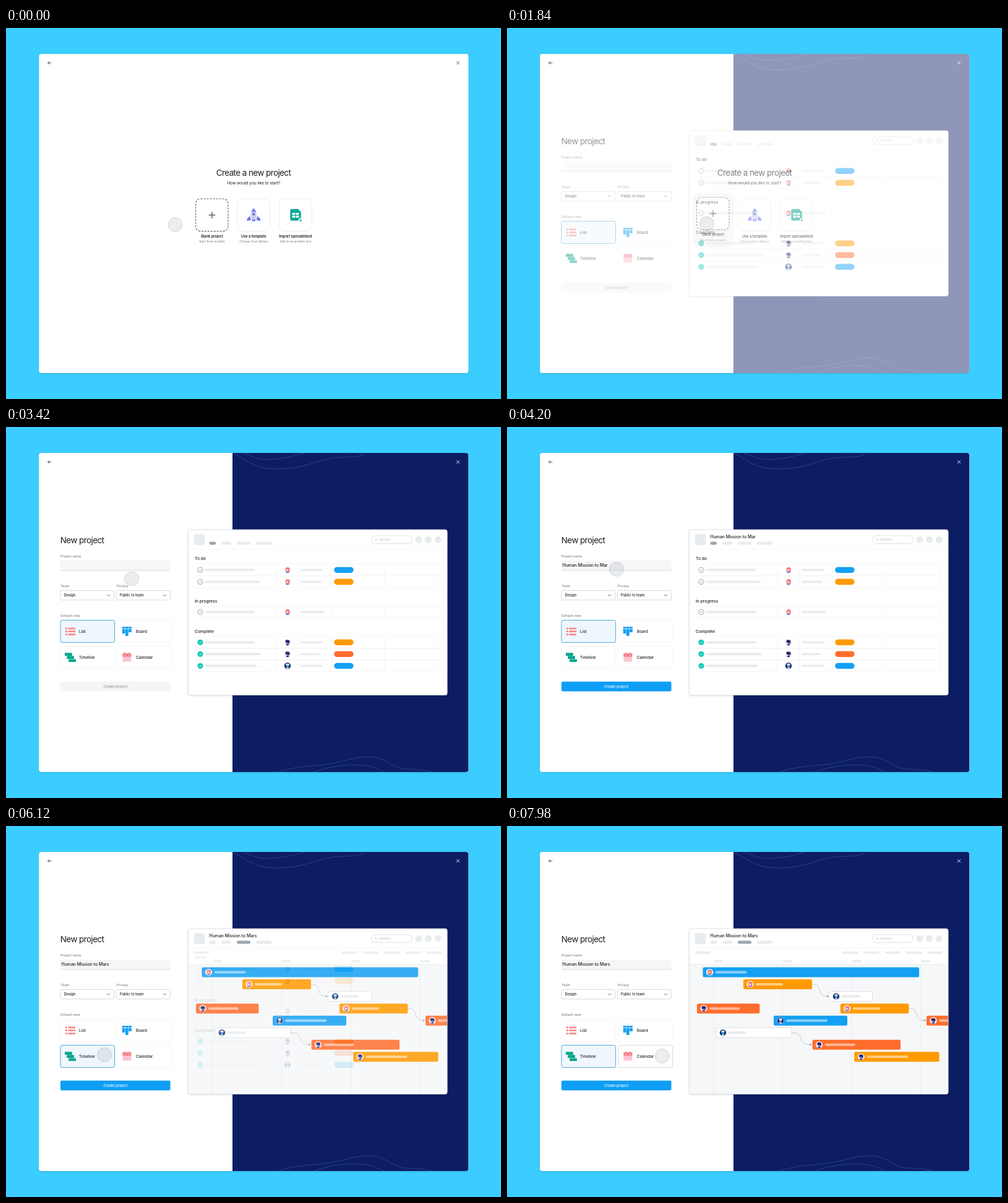
These frames come from a looping animation (800x600 px, 8 s). An HTML page:

```html
<!DOCTYPE html>
<html lang="en">
<head>
<meta charset="utf-8">
<title>New project flow</title>
<style>
  html, body { margin: 0; width: 100%; height: 100%; overflow: hidden; background: #3bcdff; }
  svg { display: block; width: 100vw; height: 100vh; }
  text { font-family: Inter, "Open Sans", sans-serif; fill: #1e1f21; white-space: pre; }
  .head { font-size: 13.5px; letter-spacing: -.6px; }
  .sub { font-size: 6.7px; letter-spacing: -.1px; }
  .name { font-size: 5.75px; font-weight: 600; letter-spacing: -.05px; }
  .note { font-size: 4.9px; fill: #76787b; }
  .label { font-size: 5.4px; fill: #6a6c70; }
  .value { font-size: 5.7px; font-weight: 500; }
  .tile { font-size: 6.3px; font-weight: 500; }
  .group { font-size: 6.75px; font-weight: 500; }
  .title { font-size: 6.9px; font-weight: 500; letter-spacing: -.03px; }
  .mid { text-anchor: middle; }
</style>
</head>
<body>
<svg id="stage" viewBox="0 0 800 600" preserveAspectRatio="none" xmlns="http://www.w3.org/2000/svg"></svg>
<script>
const LOOP = 8000;
const TITLE = 'Human Mission to Mars';
const BLUE = '#14a0f3', ORANGE = '#ff9a00', RED = '#ff6d2d', TEAL = '#14c8b8', PALE = '#e8ecee';

const rect = (x, y, w, h, r, fill, extra = '') =>
  `<rect x="${x}" y="${y}" width="${w}" height="${h}" rx="${r}" fill="${fill}" ${extra}/>`;
const pill = (x, y, w, h, fill = PALE, extra = '') => rect(x, y - h / 2, w, h, h / 2, fill, extra);
const dot = (x, y, r, fill, extra = '') => `<circle cx="${x}" cy="${y}" r="${r}" fill="${fill}" ${extra}/>`;
const line = (d, stroke, width = 1, extra = '') =>
  `<path d="${d}" fill="none" stroke="${stroke}" stroke-width="${width}" ${extra}/>`;
const shape = (d, fill) => `<path d="${d}" fill="${fill}"/>`;
const text = (x, y, cls, str, extra = '') => `<text x="${x}" y="${y}" class="${cls}" ${extra}>${str}</text>`;
const group = (id, body, extra = '') => `<g id="${id}" ${extra}>${body}</g>`;

// Small portraits: 0 coral hair, 1 dark hair, 2 white cap
function avatar(x, y, kind) {
  const looks = [
    dot(0, 0, 5, '#fdeaea') + rect(-3, -4, 6.4, 7.4, 2.2, '#f5696f') +
      shape('M-1.8-1.5H1.4V1.6Q0 3-1.8 1.6Z', '#ffd0c2') + shape('M-3.4 4Q0 1.4 3.2 3.8Q0 6.2-3.4 4Z', '#5b8fd8'),
    dot(0, 0, 5, '#ffcfd2') + shape('M-3.6-1Q-3-4.2.4-3.8Q3.8-3.6 3.4-.6L2.4 1.8Q0 3-1.4 1Z', '#0f1f66') +
      shape('M-1-.8H1.8V1.4Q.4 2.4-1 1Z', '#3d56b8') + shape('M-2.8 4.1Q0 1.6 2.8 4.1Q0 5.8-2.8 4.1Z', '#1b2f85'),
    dot(0, 0, 5.2, '#12306f') + shape('M-3-1Q-2.6-3.8 0-3.7Q2.8-3.7 3-1Z', '#fff') +
      shape('M-1.8-.9H2V1.6Q.2 3-1.8 1.6Z', '#64b5ee') + shape('M-2.8 4Q0 1.6 2.8 4Q0 5.8-2.8 4Z', '#e8f2fb')
  ];
  return `<g transform="translate(${x} ${y})">${looks[kind]}</g>`;
}

function startScreen() {
  const rocket = shape('M394 304L389.6 308.6V312.2L396 310.4ZM406.200 304L411 308.600V312.200L404.600 310.400Z', '#6f78e8') +
    shape('M400.300 291.500Q405.400 296 405 304L403.800 310.600H396.800L395.600 304Q395.200 296 400.300 291.500Z', '#c9cbf4') +
    shape('M400.300 291.500Q403.200 294 404.200 297.600H396.400Q397.400 294 400.300 291.500Z', '#7c84ea') +
    dot(400.3, 301.2, 1.7, '#4e56c0') + rect(397.6, 309.8, 5.4, 2.6, .6, '#6f78e8');
  const sheet = shape('M461.500 292.800H472L476.800 297.500V309.500Q476.800 311.600 474.700 311.600H461.500Q459.300 311.600 459.300 309.400V295Q459.300 292.800 461.500 292.800Z', '#0da898') +
    [[462.6, 299], [468.6, 299], [462.6, 303.6], [468.6, 303.6]].map(([x, y]) => rect(x, y, 4.8, 3.2, .6, '#fff')).join('') +
    dot(476.2, 311, 3.4, '#fff') + line('M476.200 308.800V313.200M474 311H478.400', '#0da898', 1);
  const frame = x => rect(x, 276, 52.6, 52.6, 8, '#fff', 'stroke="#e6e8ea" stroke-width=".8"');
  const caption = (x, a, b) => text(x, 338.7, 'name mid', a) + text(x, 347, 'note mid', b);
  return text(400, 238.6, 'head mid', 'Create a new project') +
    text(400.3, 252.6, 'sub mid', 'How would you like to start?') +
    group('glow', rect(300, 267, 66, 88, 9, '#f4f5f6')) +
    group('blank', rect(306.6, 276.2, 52.4, 52.4, 8, '#fff', 'stroke="#5d6166" stroke-width="1.1" stroke-dasharray="3.1 1.9"') +
      line('M327.800 302.500H338.200M333 297.300V307.700', '#56595d', 1.4) +
      caption(333, 'Blank project', 'Start from scratch')) +
    frame(374) + rocket + caption(400.3, 'Use a template', 'Choose from library') +
    frame(441.8) + sheet + caption(468, 'Import spreadsheet', 'Add from another tool');
}

const TILES = [['List', 88, 312.5], ['Board', 180, 312.5], ['Timeline', 88, 354.5], ['Calendar', 180, 354.5]];

function icons() {
  const list = [325.8, 330.7, 335.6].map(y =>
    rect(96, y - 1.4, 2.8, 2.8, .7, '#f8787f') + rect(100.2, y - 1.4, 12, 2.8, .7, '#f88a8c')).join('');
  const board = [[187.8, 7.2], [193, 11.4], [198.2, 5.4]].map(([x, h]) =>
    rect(x, 323, 4.7, 2.9, .5, BLUE) + rect(x, 326.7, 4.7, h, .5, BLUE)).join('');
  const bars = [[95, 365.2], [98.2, 370.3], [101.2, 375.4]].map(([x, y]) => rect(x, y, 11.8, 4.7, .5, '#0aa68c')).join('');
  const cal = rect(188.4, 366, 14, 13.6, 1, '#fcc5d2') + rect(188.4, 366, 14, 5.4, 1, '#f7808a') +
    [191, 198.2].map(x => rect(x, 364.6, 1.6, 2.6, .5, '#f7808a') + dot(x + .8, 368.8, .7, '#fff')).join('');
  return list + board + bars + cal;
}

function form() {
  const select = (x, w, label, value) => text(x + .2, 258.8, 'label', label) +
    rect(x, 264.5, w, 15.3, 2, '#fff', 'stroke="#cdd1d5" stroke-width=".8"') +
    text(x + 5.4, 274.3, 'value', value) +
    line(`M${x + w - 11.600} 271l2.600 2.500 2.600-2.500`, '#55585c', .8);
  const tiles = TILES.map(([name, x, y], i) =>
    rect(x, y, 87.6, 36, 3, '#fff', 'stroke="#f1f3f4" stroke-width=".8"') +
    rect(x, y, 87.6, 36, 3, 'none', `id="hover${i}" stroke="#d4d8dc" stroke-width=".9"`) +
    rect(x, y, 87.6, 36, 3, '#eff7fd', `id="pick${i}" stroke="#55abd8" stroke-width="1"`)).join('');
  const names = TILES.map(([name, x, y]) => text(x + 30, y + 20.4, 'tile', name)).join('');
  return text(87.8, 187.6, 'head', 'New project') +
    text(88, 210.8, 'label', 'Project name') +
    rect(88, 216, 177.6, 16, 1, '#f5f6f8') + line('M88 232H265.600', '#cad3da', .8) +
    text(89.6, 226.3, 'title', '', 'id="field"') +
    select(88, 86.6, 'Team', 'Design') + select(178.6, 87, 'Privacy', 'Public to team') +
    text(88, 307, 'label', 'Default view') + tiles + icons() + names +
    rect(88, 411.8, 177.6, 15.8, 2, '#f4f5f6', 'id="button"') +
    text(176.8, 421.8, 'value mid', 'Create project', 'id="action"');
}

function listView() {
  // y, task width, avatar, note width, tag colour, done
  const rows = [
    [231.2, 80, 0, 36, BLUE], [250.4, 88, 0, 33, ORANGE], [299.2, 80, 0, 39, ''],
    [348.2, 80, 1, 36, ORANGE, 1], [367.2, 90, 1, 31, RED, 1], [386.3, 83, 2, 36, BLUE, 1]
  ];
  const cells = rows.map(([y, w, face, n, tag, done]) =>
    line(`M305 ${y - 9.600}H701M305 ${y + 9.600}H701` +
      [436.8, 472.4, 525.4, 612, 701].map(x => `M${x} ${y - 9.600}V${y + 9.600}`).join(''), '#f1f3f4', .7) +
    dot(314, y, 4.2, done ? TEAL : '#fff', `stroke="${done ? TEAL : '#84898e'}" stroke-width=".8"`) +
    line(`M312.100 ${y + .100}l1.400 1.400 2.700-2.800`, done ? '#fff' : '#84898e', .8) +
    pill(322, y, w, 4) + avatar(455, y, face) + pill(476.4, y, n, 3.6) +
    (tag && pill(530.2, y, 31.4, 9.6, tag))).join('');
  return rect(295, 198, 418, 235, 0, '#fff') + line('M295 197.500H713', '#f3f4f5', .7) +
    text(305, 215.4, 'group', 'To do') + text(305, 283.5, 'group', 'In progress') +
    text(305, 332.8, 'group', 'Complete') + cells;
}

function timelineView() {
  // x, width, colour, avatar, label width; one bar per lane unless a lane is given
  const bars = [
    [316.5, 349.6, BLUE, 0, 51, 0], [382, 111, ORANGE, 0, 44, 1], [521, 69.6, '#fff', 2, 29, 2],
    [307, 101.4, RED, 1, 49, 3], [538.8, 110.6, ORANGE, 0, 44, 3], [678, 60, RED, 1, 40, 4],
    [431, 119, BLUE, 2, 67, 4], [338, 122, '#fff', 2, 29, 5], [493.6, 142.4, RED, 1, 49, 6],
    [561.2, 137.4, ORANGE, 1, 67, 7]
  ];
  const drawn = bars.map(([x, w, fill, face, n, lane]) => {
    const y = 228.5 + lane * 19.55, white = fill === '#fff';
    return rect(x, y, w, 16, 2.5, fill, white ? 'stroke="#d5d8dc" stroke-width=".8"' : '') +
      (white ? '' : dot(x + 11, y + 8, 5.6, '#fff')) + avatar(x + 11, y + 8, face) +
      pill(x + 20, y + 8, n, 4, white ? PALE : '#fff', white ? '' : 'opacity=".5"');
  }).join('');
  const link = (x, y, w) => line(`M${x} ${y}C${x + w * .700} ${y} ${x + w * .200} ${y + 19.500} ${x + w - 3} ${y + 19.500}`, '#b9bec4', .8) +
    shape(`M${x + w - 4} ${y + 17.500}l3.400 2-3.400 2Z`, '#9da3aa');
  const marks = [334, 445.4, 557.4, 669];
  return rect(295, 198, 418, 26, 0, '#fff') + rect(295, 224, 418, 210, 0, '#f6f7f8') +
    line('M295 197.500H713', '#f3f4f5', .7) + line('M295 223.600H713', '#e3e6e8', .7) +
    line(marks.map(x => `M${x} 224V433.500`).join(''), '#e6e8ea', .8) +
    [303.6, 542.4, 576.6, 611, 645.2, 679.6].map(x => pill(x, 204.6, 25, 3.6)).join('') +
    marks.map(x => pill(x, 218.8, 15.4, 3.6)).join('') +
    link(493, 256, 28) + link(649.4, 295, 28.6) + link(460, 334, 33.6) + drawn;
}

function preview() {
  const tabs = [[328.5, 10.6], [348, 16], [373, 22], [404, 25.4]]
    .map(([x, w], i) => pill(x, 188, w, 5, PALE, `id="tab${i}"`)).join('');
  return rect(294.5, 166, 418.6, 267.6, 3.5, '#fff', 'filter="url(#soft)"') +
    `<g clip-path="url(#board)">` +
    rect(294.5, 166, 418.6, 267.6, 0, '#fff') +
    rect(303.6, 173.2, 17.8, 17.8, 3, PALE) + tabs +
    text(328.6, 179.6, 'title', '', 'id="heading"') +
    rect(590.6, 175.8, 66, 12.6, 6.3, '#fff', 'stroke="#d3d8db" stroke-width=".8"') +
    dot(598, 182.1, 2.4, PALE) + pill(602.6, 182.1, 19.6, 4) +
    [667, 682.6, 698.2].map(x => dot(x, 182.1, 5.6, PALE)).join('') +
    listView() + group('timeline', timelineView()) + '</g>' +
    rect(294.5, 166, 418.6, 267.6, 3.5, 'none', 'stroke="#d8dbe0" stroke-width=".8"');
}

function sidePanel() {
  return rect(366, 42, 382, 516, 0, '#0d1d63') +
    line('M366 43C388 51 396 65 428 67.500C482 70 502 52 535 49.500C554 48 566 50 579 44M383 42C400 49 408 54 432 52C458 50 466 46 482 42' +
      'M440 558C470 548 492 549 522 545C552 540 566 532 592 533.500C618 536 624 553 650 553.500C670 554 678 555 688 558' +
      'M497 558C524 549 538 547 562 546.500C588 546 598 552 611 558', '#5c9cd8', .8, 'opacity=".36"');
}

const stage = document.getElementById('stage');
stage.innerHTML = `<defs>
  <clipPath id="window">${rect(53.5, 42, 693.7, 516, 4, '#000')}</clipPath>
  <clipPath id="board">${rect(294.5, 166, 418.600, 267.600, 3.500, '#000')}</clipPath>
  <filter id="soft" x="-10%" y="-10%" width="120%" height="120%">
    <feDropShadow dx="0" dy="1" stdDeviation="1.6" flood-color="#123" flood-opacity=".16"/></filter>
  </defs>` +
  rect(0, 0, 800, 600, 0, '#3bcdff') +
  rect(53.5, 42, 693.7, 516, 4, '#fff', 'filter="url(#soft)"') +
  `<g clip-path="url(#window)">` +
  rect(53, 42, 695, 516, 0, '#fff') + startScreen() +
  group('setup', rect(53, 42, 313, 516, 0, '#fff') + sidePanel() + form() + preview()) +
  line('M73.400 56.500H67.600M70 54L67.500 56.500 70 59', '#4b4e52', .9) +
  line('M728 54l5 5M733 54l-5 5', '#55585c', .9, 'id="close"') + '</g>' +
  dot(0, 0, 11.4, 'rgba(110,115,120,.13)', 'id="pointer" stroke="rgba(90,95,100,.27)" stroke-width=".8"');

const el = {};
stage.querySelectorAll('[id]').forEach(node => el[node.id] = node);
const set = (id, name, value) => el[id].setAttribute(name, value);

const clamp = v => Math.min(1, Math.max(0, v));
const ease = p => p < .5 ? 2 * p * p : 1 - 2 * (1 - p) * (1 - p);
const step = (t, a, b) => ease(clamp((t - a) / (b - a)));

// start, end, x, y
const moves = [[800, 1100, 323, 316.5], [3000, 3600, 177, 230], [4840, 5310, 159, 370], [7100, 7560, 251, 372]];

function pointerAt(t) {
  let x = 273.4, y = 318;
  for (const [a, b, toX, toY] of moves) {
    const p = step(t, a, b);
    x += (toX - x) * p;
    y += (toY - y) * p;
  }
  return [x, y];
}

function draw(t) {
  const [x, y] = pointerAt(t);
  set('pointer', 'cx', x);
  set('pointer', 'cy', y);

  const lift = step(t, 940, 1100);
  set('glow', 'opacity', lift);
  set('blank', 'transform', `translate(0 ${-2.2 * lift})`);

  set('setup', 'opacity', step(t, 1600, 2100));
  set('close', 'stroke', t < 1600 ? '#55585c' : '#fff');

  const typed = TITLE.slice(0, Math.round(TITLE.length * clamp((t - 3640) / 600)));
  el.field.textContent = el.heading.textContent = typed;
  set('button', 'fill', typed ? '#0f9ef5' : '#f4f5f6');
  el.action.style.fill = typed ? '#fff' : '#94989d';

  const swap = step(t, 5760, 6260), pick = step(t, 5740, 5900);
  set('timeline', 'opacity', swap);
  set('tab0', 'fill', swap < .5 ? '#9da6b0' : PALE);
  set('tab2', 'fill', swap < .5 ? PALE : '#9da6b0');
  TILES.forEach(([, left, top], i) => {
    const inside = x > left && x < left + 87.6 && y > top && y < top + 36;
    set('hover' + i, 'opacity', inside && t > 2200 ? 1 : 0);
    set('pick' + i, 'opacity', i === 0 ? 1 - pick : i === 2 ? pick : 0);
  });
}

function tick() {
  draw(performance.now() % LOOP);
  requestAnimationFrame(tick);
}
tick();
</script>
</body>
</html>
```
